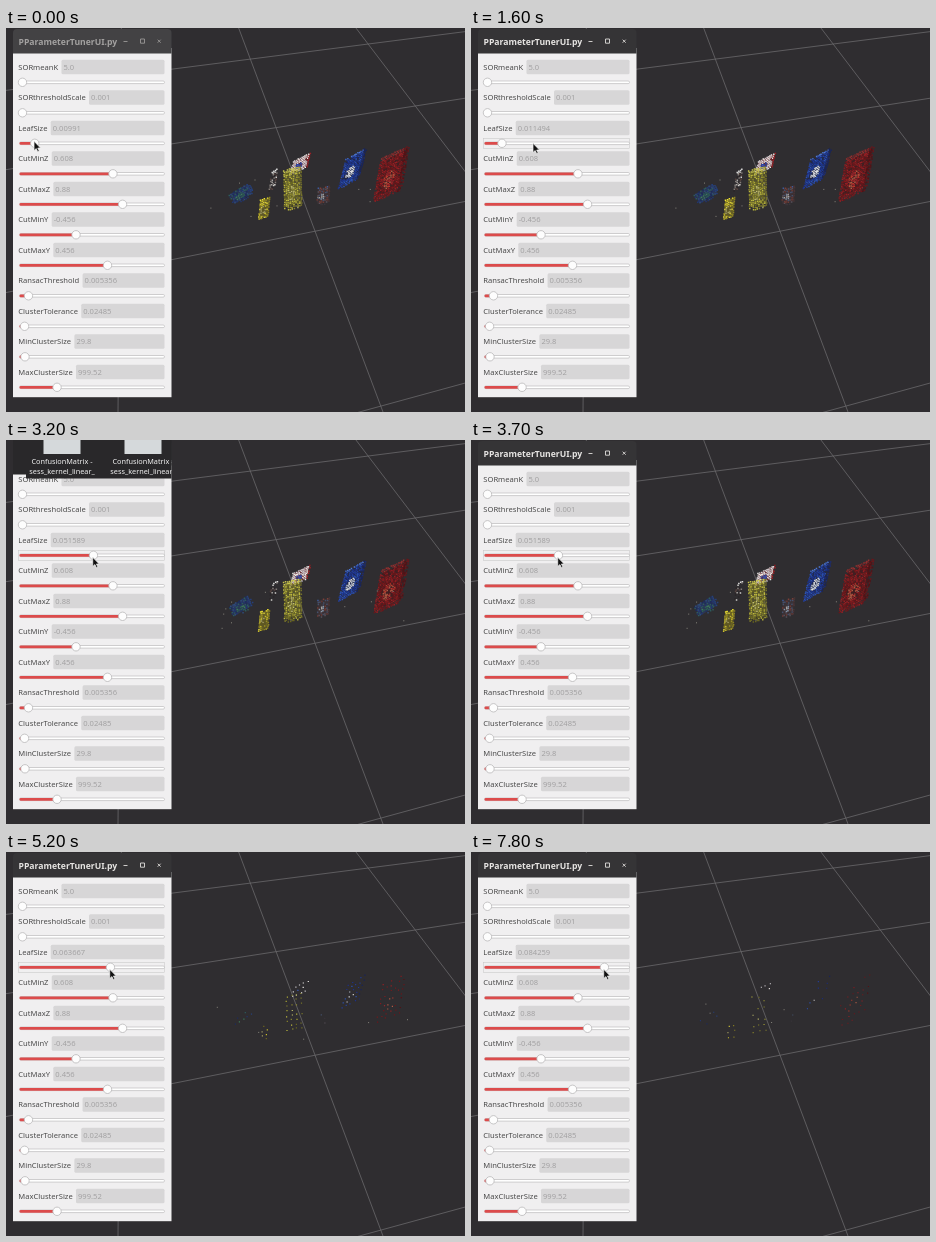
Recreate the animation shown at these times as an HTML page. Size 459 by 384 pixels, loop 8 s.

```html
<!DOCTYPE html>
<html lang="en">
<head>
<meta charset="utf-8">
<title>Point cloud parameter tuner</title>
<style>
html, body { margin: 0; width: 100%; height: 100%; overflow: hidden; background: #2f2d30; }
svg { display: block; }
text { font-family: "Noto Sans", "Open Sans", sans-serif; font-size: 7.6px; white-space: pre; }
</style>
</head>
<body>
<svg id="stage" width="459" height="384" viewBox="0 0 459 384">
  <defs>
    <clipPath id="win"><rect x="7" y="0" width="158.5" height="384"/></clipPath>
  </defs>
  <rect width="459" height="384" fill="#2f2d30"/>
  <g id="grid" stroke="#6a696b" stroke-width=".8"></g>
  <g id="cloud" fill="none"></g>
  <g id="panel"></g>
  <g id="switcher" clip-path="url(#win)"></g>
  <path id="cursor" d="M0 0V9.2L2.2 7.3L3.7 10.5L5.2 9.8L3.7 6.7H6.5Z" fill="#111" stroke="#f4f4f4" stroke-width=".7"/>
</svg>
<script>
const NS = "http://www.w3.org/2000/svg";
const LOOP = 8000;
const $ = id => document.getElementById(id);

function add(parent, tag, attrs, text) {
  const el = document.createElementNS(NS, tag);
  for (const key in attrs) el.setAttribute(key, attrs[key]);
  if (text) el.textContent = text;
  parent.appendChild(el);
  return el;
}

function random(seed) {
  return () => {
    seed = (seed + 0x6D2B79F5) | 0;
    let r = Math.imul(seed ^ (seed >>> 15), 1 | seed);
    r = (r + Math.imul(r ^ (r >>> 7), 61 | r)) ^ r;
    return ((r ^ (r >>> 14)) >>> 0) / 4294967296;
  };
}

// Ground grid: two families of lines running to vanishing points on one horizon
const horizon = -305;
for (let i = 0; i < 4; i++) {
  add($("grid"), "line", { x1: 118, y1: horizon, x2: 112 + 265 * i, y2: 384 });
  const drop = 1 / (.001515 + .000575 * i);
  add($("grid"), "line", { x1: 2870, y1: horizon, x2: 459 - 459, y2: horizon + drop * 2870 / 2411 });
}

// Scanned objects: skewed boxes spanned by u and v, coloured by face
const objects = [
  { at: [235, 166], u: [11, -6.5], v: [3, 6], round: 3, body: "#22356f #1c2a5c #2f4a78 #2d5a5c", badge: "#3d7a58 #2c5f52", top: "#4561a0 #22356f", side: "#26407c" },
  { at: [267, 152], u: [4, -2], v: [-1.5, 11], round: 3, thin: .6, body: "#d0cecb #837c78 #55423e #2a2527", badge: "#a9a5a2", top: "#dddddd", side: "#6a4a42" },
  { at: [294, 136], u: [10, -5], v: [-2, 8], round: 5, body: "#d9d8dc #c4c0c4 #ece9e6", badge: "#2d44a0 #3e5fc0", top: "#d9d8dc", side: "#a01f24 #8e1d22" },
  { at: [286.5, 160], u: [10, -2], v: [.5, 21], round: 6, body: "#a9a534 #8a862c #bdb93f #68651f", badge: "#c3c06e #8d8a30", top: "#c7c44a", side: "#75722a" },
  { at: [258, 180], u: [6, -2], v: [-1, 11], round: 5, body: "#c9bd2a #9a8f24 #70681e #d8cc38", badge: "#a39d62 #5f5820", top: "#efe430", side: "#8a8022" },
  { at: [317, 167], u: [7, -1.5], v: [-.5, 9.5], round: 5, body: "#58505a #43506c #6d3a34 #39343a", badge: "#8496aa #a5a2a0", top: "#7b4038 #3d5c9c", side: "#4a3436" },
  { at: [346, 140.5], u: [11, -6], v: [-4, 16], round: 8, body: "#233f9e #1c318a #2c52b4 #1f3a94", badge: "#dcdee2 #b4bccb #d2d0d2", top: "#4d78d8 #3d64c6", side: "#16235e #1b2c74" },
  { at: [385, 146], u: [15, -7], v: [-4, 23], round: 8, body: "#831a1e #6c1418 #961e23 #741a1c", badge: "#b8382c #9c242a #b05a44", top: "#94302f #7a2427", side: "#551013 #68161a" }
];

function face(o, u, v) {
  if (u > .72) return o.side;
  if (v < -.8) return o.top;
  return (u + .1) ** 2 + (v - .2) ** 2 < .14 ? o.badge : o.body;
}

function buildLayer({ step, keep, size, jitter, seed, strays, solid = 0 }) {
  const rnd = random(seed);
  const layer = add($("cloud"), "g", { "stroke-width": size });
  const wobble = () => (rnd() - .5) * jitter;
  for (const o of objects) {
    const paths = {};
    const du = step / Math.hypot(...o.u), dv = step / Math.hypot(...o.v);
    const place = (u, v) => [0, 1].map(i => o.at[i] + u * o.u[i] + v * o.v[i]);
    for (let u = -1; u <= 1; u += du) {
      for (let v = -1; v <= 1; v += dv) {
        const [x, y] = place(u, v).map(c => c + wobble());
        const show = rnd() < keep * (o.thin || 1), pick = rnd();
        if (!show || Math.abs(u) ** o.round + Math.abs(v) ** o.round > 1) continue;
        const hues = face(o, u, v).split(" ");
        const hue = hues[Math.floor(pick * hues.length)];
        paths[hue] = (paths[hue] || "") + `M${(x - size / 2).toFixed(1)} ${y.toFixed(1)}h${size}`;
      }
    }
    if (solid && !o.thin) {
      const corners = [[-.8, -.8], [.8, -.8], [.8, .8], [-.8, .8]].map(c => place(...c));
      add(layer, "polygon", { points: corners.join(" "), fill: o.side.split(" ")[0], opacity: solid });
    }
    for (const hue in paths) add(layer, "path", { d: paths[hue], stroke: hue });
  }
  let d = "";
  for (let i = 0; i < strays; i++) d += `M${(203 + rnd() * 200).toFixed(1)} ${(146 + rnd() * 44).toFixed(1)}h1`;
  add(layer, "path", { d, stroke: "#85837a", "stroke-width": 1 });
  return layer;
}

const dense = { step: 1.9, keep: .9, size: 1.5, jitter: .8, strays: 12, solid: .5 };
const layers = [
  { ...dense, from: 0, seed: 5 },
  { ...dense, from: 2000, seed: 8 },
  { ...dense, from: 3900, seed: 9, step: 2 },
  { from: 4900, seed: 21, step: 4.8, keep: .75, size: 1.2, jitter: 1.6, strays: 5 },
  { from: 7500, seed: 34, step: 5.8, keep: .62, size: 1.1, jitter: 2, strays: 4 }
].map(spec => ({ from: spec.from, el: buildLayer(spec) }));

// Panel rows: label, value, slider position from 0 to 1
const rows = [
  ["SORmeanK", "5.0", .012],
  ["SORthresholdScale", "0.001", .012],
  ["LeafSize", "0.00991", .1],
  ["CutMinZ", "0.608", .661],
  ["CutMaxZ", "0.88", .73],
  ["CutMinY", "-0.456", .396],
  ["CutMaxY", "0.456", .622],
  ["RansacThreshold", "0.005356", .055],
  ["ClusterTolerance", "0.02485", .027],
  ["MinClusterSize", "29.8", .03],
  ["MaxClusterSize", "999.52", .26]
];
const knobX = part => 14.8 + part * 139.4;

const panel = $("panel");
add(panel, "rect", { x: 7, y: 20, width: 158.5, height: 349.2, fill: "#f0eff0" });
const bar = add(panel, "path", { d: "M7 25.4V5Q7 1 11 1H161.5Q165.5 1 165.5 5V25.4Z" });
const title = add(panel, "text", { x: 12.5, y: 16.6, "font-weight": 700, style: "font-size:8.65px" }, "PParameterTunerUI.py");
const buttons = add(panel, "path", {
  d: "M117.5 13.5h4M134.5 11h4v4.200h-4ZM151.7 11.7l3 3m0-3l-3 3",
  fill: "none", "stroke-width": .9
});

const sliders = rows.map(([label, value, part], i) => {
  const y = 39 + i * 30.5, gy = y + 15.3, knob = knobX(part);
  const name = add(panel, "text", { x: 12.3, y: y + 2.8, fill: "#4a4a4a" }, label);
  const vx = 12.3 + name.getComputedTextLength() + 5.3;
  add(panel, "rect", { x: vx - 2, y: y - 7.2, width: 160.5 - vx, height: 14.4, rx: 1.5, fill: "#d7d6d7" });
  const text = add(panel, "text", { x: vx, y: y + 2.8, fill: "#a3a2a3" }, value);
  add(panel, "rect", { x: 13.5, y: gy - 1.3, width: 145, height: 2.6, rx: 1.3, fill: "#fff", stroke: "#bdbcbd", "stroke-width": .7 });
  const fill = add(panel, "rect", { x: 13.5, y: gy - 1.4, width: knob - 13.5, height: 2.8, rx: 1.3, fill: "#dc4b4b" });
  const dot = add(panel, "circle", { cx: knob, cy: gy, r: 4.2, fill: "#fdfdfd", stroke: "#b9b8b9", "stroke-width": .8 });
  return { text, fill, dot };
});
const leaf = sliders[2];
const focus = add(panel, "rect", {
  x: 12.5, y: 110.5, width: 146, height: 10, fill: "none", stroke: "#c4c3c4", "stroke-width": .5
});

const switcher = $("switcher");
add(switcher, "path", { d: "M7 0H166V38.5H20V34.5H7Z", fill: "#29282a" });
for (const cx of [56, 137]) {
  add(switcher, "rect", { x: cx - 18.5, y: -23, width: 37, height: 37, fill: "#d5d9db" });
  ["ConfusionMatrix -", "sess_kernel_linear_"].forEach((line, i) =>
    add(switcher, "text", { x: cx, y: 23.7 + i * 10.4, fill: "#f2f2f2", "text-anchor": "middle", style: "font-size:7.3px" }, line));
}

// Drags of the LeafSize knob: start, end, step reached
const drags = [[400, 900, 116], [1800, 2436, 521], [4600, 5000, 643], [5600, 6100, 735], [7300, 7600, 851]];
const clamp = p => Math.min(1, Math.max(0, p));
const easeOut = p => 1 - (1 - p) ** 2;
const leafStep = t => Math.round(drags.reduce(
  (k, [from, to, goal]) => k + (goal - k) * easeOut(clamp((t - from) / (to - from))), 100));

const show = (el, on) => el.setAttribute("visibility", on ? "visible" : "hidden");

function draw(time) {
  const t = Math.floor(time % LOOP / 100) * 100;

  const k = leafStep(t);
  const x = knobX(k / 1000);
  leaf.text.textContent = String(parseFloat((.00001 + k * .000099).toFixed(6)));
  leaf.fill.setAttribute("width", x - 13.5);
  leaf.dot.setAttribute("cx", x);

  const active = t >= 400;
  bar.setAttribute("fill", active ? "#353436" : "#434244");
  title.setAttribute("fill", active ? "#e6e4e2" : "#a3a1a0");
  buttons.setAttribute("stroke", active ? "#e0dedc" : "#9a9897");
  show(focus, active);
  show(switcher, t >= 3000 && t < 3600);

  layers.forEach((l, i) => {
    const next = layers[i + 1];
    show(l.el, t >= l.from && (!next || t < next.from));
  });

  // The pointer runs ahead of the knob once, then the knob catches up
  const ahead = 31 + 31 * easeOut(clamp((t - 1200) / 300));
  const mx = Math.max(x - .7, t < 1200 ? 0 : ahead);
  const my = Math.min(117.3, 113.3 + t * .00125);
  $("cursor").setAttribute("transform", `translate(${mx} ${my})`);
}

const start = performance.now();
function loop() {
  draw(performance.now() - start);
  requestAnimationFrame(loop);
}
draw(0);
requestAnimationFrame(loop);
</script>
</body>
</html>
```
